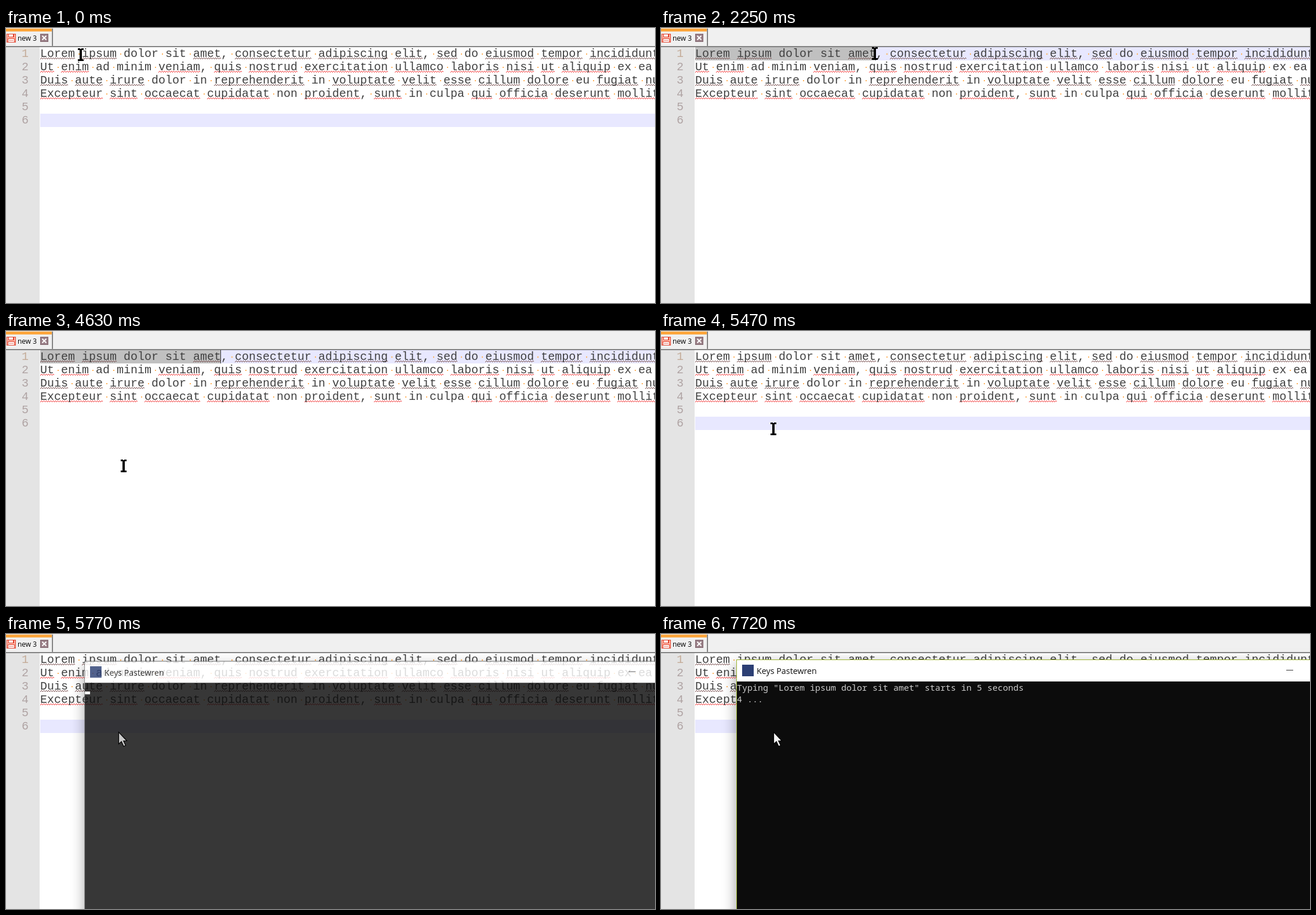
Animation, 1120 px wide and 475 px high, one loop 8 s. Source, as an HTML page with a canvas:

```html
<!DOCTYPE html>
<html lang="en">
<head>
<meta charset="utf-8">
<title>Text editor</title>
<style>
html, body { margin: 0; width: 100%; height: 100%; overflow: hidden; background: #fff; }
canvas { display: block; }
</style>
</head>
<body>
<canvas id="stage" width="1120" height="475"></canvas>
<script>
const W = 1120, H = 475, LOOP = 8000;
const LEFT = 59, TOP = 33, ROW = 23, COL = 12;
const CODE = '20px "Liberation Mono", monospace';
const UI = '"Open Sans", "Noto Sans", sans-serif';
const TERM = '15px "Noto Sans Mono", monospace';

const LINES = [
  'Lorem ipsum dolor sit amet, consectetur adipiscing elit, sed do eiusmod tempor incididunt',
  'Ut enim ad minim veniam, quis nostrud exercitation ullamco laboris nisi ut aliquip ex ea',
  'Duis aute irure dolor in reprehenderit in voluptate velit esse cillum dolore eu fugiat nulla',
  'Excepteur sint occaecat cupidatat non proident, sunt in culpa qui officia deserunt mollit'
];
const KNOWN = new Set('dolor sit do ad minim in ex ea non culpa eu'.split(' '));

// '-' is a separator, a trailing '>' marks a submenu
const MENU = [
  'Couper', 'Copier', 'Coller', 'Supprimer', 'Sélectionner tout', 'Début/Fin Sélection', '-',
  'Style token>', 'Remove style>', '-', 'Plugin commands>', '-',
  'EN MAJUSCULE', 'en minuscule', '-', 'Ouverture du fichier', 'Rechercher sur Internet', '-',
  'Commenter/Décommenter (mode ligne)', 'Commenter le bloc sélectionné',
  'Décommenter le bloc sélectionné', '-'
];

// Pointer moves: first step, last step, number of steps, path
const MOVES = [
  [80, 700, 9, [[129, 45.5], [117, 48], [92, 50], [72, 46], [63, 43], [62, 44]]],
  [860, 1550, 10, [[62, 44], [64, 43], [140, 41], [250, 39], [335, 41], [388, 44]]],
  [1720, 1860, 3, [[388, 44], [370, 43], [363, 43], [362, 43.5]]],
  [2010, 2250, 4, [[362, 43.5], [369, 43.5]]],
  [3190, 3520, 5, [[369, 45], [372, 62], [375, 83], [376, 85], [376, 86], [376, 86]]],
  [4210, 4840, 9, [[376, 86], [376, 86], [350, 120], [300, 175], [255, 215],
    [220, 232], [203, 233], [197, 215], [194, 185], [194, 169]]]
];

// Window opening: time, opacity, scale
const OPENING = [[5700, .506, .973], [5770, .82, .99], [5850, .963, .9975], [5930, .99, .9995], [6010, 1, 1]];

function makeCanvas() {
  const c = document.createElement('canvas');
  c.width = W;
  c.height = H;
  return c;
}

const ctx = document.getElementById('stage').getContext('2d');
const sheet = makeCanvas();
const sheetCtx = sheet.getContext('2d');

const within = (t, a, b) => t >= a && t < b;

function box(g, color, x, y, w, h) {
  g.fillStyle = color;
  g.fillRect(x, y, w, h);
}

function label(g, text, x, y, font, color) {
  g.font = font;
  g.fillStyle = color;
  g.fillText(text, x, y);
}

function line(g, points, color, width = 1) {
  g.strokeStyle = color;
  g.lineWidth = width;
  g.beginPath();
  points.forEach(([x, y]) => g.lineTo(x, y));
  g.stroke();
}

function along(path, p) {
  const s = p * (path.length - 1);
  const i = Math.min(Math.floor(s), path.length - 2);
  const f = s - i;
  return [0, 1].map(k => path[i][k] + (path[i + 1][k] - path[i][k]) * f);
}

function pointerAt(t) {
  let pos = MOVES[0][3][0];
  for (const [from, to, n, path] of MOVES) {
    if (t < from) break;
    const step = Math.floor((t - from) / (to - from) * (n - 1) + .25) + 1;
    pos = along(path, Math.min(step, n) / n);
  }
  return pos;
}

function drawTab() {
  box(ctx, '#f0f0f0', 0, 0, W, 32);
  box(ctx, '#fca63c', 0, 1, 80, 5);
  box(ctx, '#a0a0a0', 79, 1, 1, 30);
  box(ctx, '#696969', 80, 1, 1, 30);
  box(ctx, '#a0a0a0', 0, 31, W, 1);
  box(ctx, '#696969', 0, 32, W, 1);
  box(ctx, '#e0402c', 1, 10, 16, 15);
  box(ctx, '#ffb8a8', 2, 11, 14, 13);
  box(ctx, '#e0402c', 4, 10, 10, 6);
  box(ctx, '#fff', 5, 11, 7, 4);
  box(ctx, '#e0402c', 3, 18, 12, 7);
  box(ctx, '#fff', 4, 19, 10, 5);
  box(ctx, '#e88070', 5, 21, 8, 1);
  label(ctx, 'new 3', 20, 22, '12px ' + UI, '#000');
  box(ctx, '#80646c', 59, 10, 14, 14);
  box(ctx, '#9a8088', 60, 11, 12, 12);
  line(ctx, [[62.5, 13.5], [69.5, 20.5]], '#fff', 2);
  line(ctx, [[69.5, 13.5], [62.5, 20.5]], '#fff', 2);
}

// Crisp zigzag, three pixels high
function squiggle(x, y, width, color) {
  for (let i = 0; i < width; i++) box(ctx, color, x + i, y + Math.abs(i % 4 - 2), 1, 1);
}

function drawText(row, text, selected) {
  const base = TOP + row * ROW + 17;
  for (const m of text.matchAll(/\w+/g)) {
    if (!KNOWN.has(m[0])) {
      squiggle(LEFT + m.index * COL, base + 1, m[0].length * COL, row % 2 ? '#f02828' : '#6a3c3c');
    }
  }
  label(ctx, text, LEFT, base, CODE, '#404040');
  for (let i = selected; i < text.length; i++) {
    if (text[i] === ' ') box(ctx, '#ffb057', LEFT + i * COL + 6, base - 6, 2, 2);
  }
}

function drawEditor(t, mouseX) {
  box(ctx, '#fff', 0, 33, W, H);
  box(ctx, '#e4e4e4', 0, 33, 58, H);
  const picking = within(t, 860, 4840);
  const current = picking ? 0 : 5;
  const top = TOP + current * ROW;
  const dragX = t < 2250 ? mouseX : 369;
  const selected = picking ? Math.max(0, Math.round((dragX - LEFT) / COL)) : 0;
  box(ctx, '#e8e8ff', LEFT, top, W, ROW);
  box(ctx, '#c0c0c0', LEFT, top, selected * COL, ROW);
  for (let i = 0; i < 6; i++) {
    label(ctx, String(i + 1), 27, TOP + i * ROW + 17, CODE, i ? '#b0a4a4' : '#c4ac98');
  }
  LINES.forEach((text, i) => drawText(i, text, i ? 0 : selected));
  const caret = within(t, 860, 2800) || within(t, 3270, 3810) || within(t, 4350, 5470);
  if (caret) box(ctx, '#303030', LEFT + selected * COL - (selected ? 1 : 0), top, 1, ROW);
}

function drawMenu(g, x, y) {
  g.save();
  g.shadowColor = 'rgba(0,0,0,.5)';
  g.shadowBlur = 4;
  g.shadowOffsetX = g.shadowOffsetY = 3;
  box(g, '#ccc', 340, 45, 365, 500);
  g.restore();
  box(g, '#f2f2f2', 341, 46, 363, 500);
  let top = 48;
  for (const item of MENU) {
    if (item === '-') {
      box(g, '#d0d0d0', 373, top + 3, 328, 1);
      top += 7;
      continue;
    }
    if (y > 50 && within(y, top, top + 24)) box(g, '#91c9f7', 343, top, 359, 24);
    label(g, item.replace('>', ''), 377, top + 18, '14.3px ' + UI, '#000');
    if (item.endsWith('>')) {
      line(g, [[687, top + 7], [691.5, top + 11.5], [687, top + 16]], '#333', 1.2);
    }
    top += 24;
  }
}

function drawWindow(g, t) {
  box(g, t < 6010 ? '#777' : '#9bb32c', 130, 44, 1100, 600);
  box(g, '#fff', 131, 45, 1100, 37);
  box(g, '#0c0c0c', 131, 82, 1100, 560);
  box(g, '#2c3f74', 140, 53, 20, 20);
  label(g, 'Keys Pastewren', 165, 69, '14.3px ' + UI, '#111');
  box(g, '#333', 1079, 62, 12, 1);
  let row = 0;
  if (t >= 6080) {
    label(g, 'Typing "Lorem ipsum dolor sit amet" starts in 5 seconds', 131, 98, TERM, '#ccc');
    row = 1;
  }
  if (t >= 7010) {
    label(g, '4 ...', 131, 118, TERM, '#ccc');
    row = 2;
  }
  if (t < 6710 || within(t, 7010, 7720)) box(g, '#f2f2f2', 131, 97 + row * 20, 9, 5);
}

// Paints a part on its own sheet so that it fades as a whole
function fade(alpha, scale, paint) {
  const g = sheetCtx;
  g.clearRect(0, 0, W, H);
  g.save();
  g.translate(644, 321);
  g.scale(scale, scale);
  g.translate(-644, -321);
  paint(g);
  g.restore();
  ctx.globalAlpha = alpha;
  ctx.drawImage(sheet, 0, 0);
  ctx.globalAlpha = 1;
}

function windowShadow(alpha, scale) {
  const x = 644 - 514 * scale, y = 321 - 277 * scale;
  ctx.save();
  ctx.beginPath();
  ctx.rect(0, 0, W, H);
  ctx.rect(x, y, W, H);
  ctx.clip('evenodd');
  ctx.shadowColor = `rgba(0,0,0,${.4 * alpha})`;
  ctx.shadowBlur = 22;
  ctx.shadowOffsetY = 8;
  box(ctx, '#000', x, y, W + 100, H + 100);
  ctx.restore();
}

function drawBeam(x, y) {
  const l = Math.round(x), m = Math.round(y);
  box(ctx, '#000', l - 2, m - 10, 4, 21);
  for (const top of [m - 11, m + 8]) {
    box(ctx, '#000', l - 5, top, 4, 3);
    box(ctx, '#000', l + 1, top, 4, 3);
  }
}

// The arrow inverts whatever lies beneath it
function drawArrow(x, y) {
  const shape = new Path2D('M0 0V20.5L4.7 16.3L8.5 24.5L12 23L8.3 15H14Z');
  ctx.save();
  ctx.translate(x + .5, y + .5);
  ctx.globalCompositeOperation = 'difference';
  ctx.fillStyle = '#fff';
  ctx.fill(shape);
  ctx.globalCompositeOperation = 'source-over';
  ctx.strokeStyle = '#000';
  ctx.lineWidth = 1.2;
  ctx.stroke(shape);
  ctx.restore();
}

function draw(t) {
  const [x, y] = pointerAt(t);
  const menuOpen = within(t, 2650, 4270);
  drawTab();
  drawEditor(t, x);
  if (menuOpen) {
    const step = Math.floor((t - 2650) / 76);
    fade(Math.min(1, .35 + step * .25), 1, g => drawMenu(g, x, y));
  }
  const stage = OPENING.filter(o => t >= o[0]).pop();
  if (stage) {
    windowShadow(stage[1], stage[2]);
    fade(stage[1], stage[2], g => drawWindow(g, t));
  }
  if (menuOpen || stage) drawArrow(x, y);
  else drawBeam(x, y);
}

let start;
function tick(now) {
  if (start === undefined) start = now;
  draw((now - start) % LOOP);
  requestAnimationFrame(tick);
}
requestAnimationFrame(tick);
</script>
</body>
</html>
```
